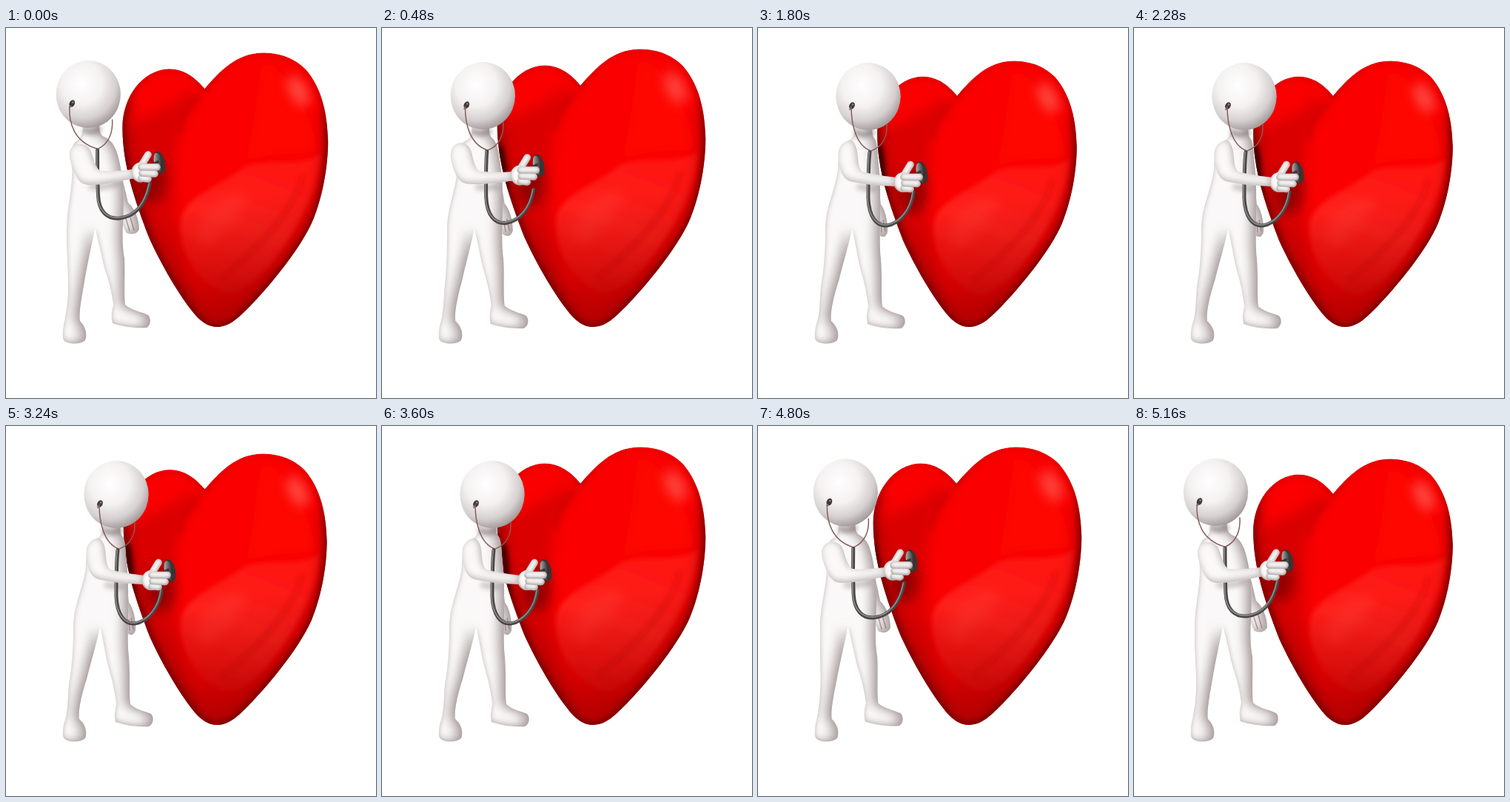
Write an HTML page that moves like this. It is 500 px wide and 500 px high and loops after 5.76 s.

```html
<!DOCTYPE html>
<html lang="en">
<head>
<meta charset="utf-8">
<title>Heart check</title>
<style>
html, body { margin: 0; width: 100%; height: 100%; overflow: hidden; background: #fff; }
svg { display: block; width: 100vw; height: 100vh; }
.tube, .wire { fill: none; stroke-linecap: round; }
.skin { fill: #faf8f8; filter: url(#round); }
.deep { filter: url(#deep); }
.finger { fill: none; stroke: #f4f1f1; stroke-width: 9.5; stroke-linecap: round; filter: url(#soft); }
.wire { stroke: #85605d; stroke-width: 1.5; }
</style>
</head>
<body>
<svg viewBox="0 0 500 500">
<defs>
  <filter id="round" filterUnits="userSpaceOnUse" x="0" y="0" width="500" height="500" color-interpolation-filters="sRGB">
    <feGaussianBlur in="SourceAlpha" stdDeviation="5"/>
    <feOffset dx="-2" dy="-2" result="b"/>
    <feComposite in="SourceAlpha" in2="b" operator="out" result="edge"/>
    <feFlood flood-color="#a39696" flood-opacity=".8"/>
    <feComposite in2="edge" operator="in" result="shade"/>
    <feMerge><feMergeNode in="SourceGraphic"/><feMergeNode in="shade"/></feMerge>
  </filter>
  <filter id="deep" filterUnits="userSpaceOnUse" x="0" y="0" width="500" height="500" color-interpolation-filters="sRGB">
    <feGaussianBlur in="SourceAlpha" stdDeviation="7"/>
    <feOffset dx="-8" dy="0" result="b"/>
    <feComposite in="SourceAlpha" in2="b" operator="out" result="edge"/>
    <feFlood flood-color="#a09292" flood-opacity=".82"/>
    <feComposite in2="edge" operator="in" result="shade"/>
    <feGaussianBlur in="SourceAlpha" stdDeviation="3"/>
    <feComposite in="SourceAlpha" operator="out" result="thin"/>
    <feFlood flood-color="#9a8e8e" flood-opacity=".5"/>
    <feComposite in2="thin" operator="in" result="line"/>
    <feComposite in="line" in2="SourceAlpha" operator="in" result="line2"/>
    <feMerge><feMergeNode in="SourceGraphic"/><feMergeNode in="shade"/><feMergeNode in="line2"/></feMerge>
  </filter>
  <filter id="soft" filterUnits="userSpaceOnUse" x="0" y="0" width="500" height="500" color-interpolation-filters="sRGB">
    <feGaussianBlur in="SourceAlpha" stdDeviation="2"/>
    <feOffset dx="-.5" dy="-1.4" result="b"/>
    <feComposite in="SourceAlpha" in2="b" operator="out" result="edge"/>
    <feFlood flood-color="#7b6f6f" flood-opacity=".85"/>
    <feComposite in2="edge" operator="in" result="shade"/>
    <feMerge><feMergeNode in="SourceGraphic"/><feMergeNode in="shade"/></feMerge>
  </filter>
  <filter id="blur3" filterUnits="userSpaceOnUse" x="0" y="-50" width="500" height="550"><feGaussianBlur stdDeviation="3"/></filter>
  <filter id="blur8" filterUnits="userSpaceOnUse" x="0" y="-50" width="500" height="550"><feGaussianBlur stdDeviation="8"/></filter>
  <radialGradient id="ball" cx=".4" cy=".34" r=".7">
    <stop offset="0" stop-color="#fff"/><stop offset=".45" stop-color="#f4f1f1"/>
    <stop offset=".75" stop-color="#d6d0d0"/><stop offset="1" stop-color="#9d9393"/>
  </radialGradient>
  <linearGradient id="rim" x1="0" y1="0" x2="0" y2="1">
    <stop offset=".06" stop-color="#c00000" stop-opacity=".3"/>
    <stop offset=".3" stop-color="#820000"/><stop offset="1" stop-color="#800000"/>
  </linearGradient>
  <linearGradient id="low" x1=".4" y1="0" x2=".55" y2="1">
    <stop offset=".55" stop-color="#8c0000" stop-opacity="0"/>
    <stop offset=".8" stop-color="#8c0000" stop-opacity=".32"/>
    <stop offset="1" stop-color="#8c0000" stop-opacity=".7"/>
  </linearGradient>
  <linearGradient id="sheen" x1=".2" y1="1" x2=".6" y2="0">
    <stop offset="0" stop-color="#f02a24" stop-opacity=".4"/>
    <stop offset=".5" stop-color="#ff2a24"/><stop offset="1" stop-color="#ff1a16"/>
  </linearGradient>
  <linearGradient id="steel" x1="0" y1="0" x2="1" y2=".4">
    <stop offset="0" stop-color="#c9c5c5"/><stop offset=".5" stop-color="#777"/><stop offset="1" stop-color="#332c2c"/>
  </linearGradient>
  <path id="outline" d="M269,91 C262,83 247,65 222,65 C187,66 161,102 161,142 C161,192 178,240 196,287 C210,318 236,365 259,391 C268,400 276,404 285,404 C297,404 306,398 316,389 C347,360 395,302 411,264 C425,230 431,190 431,160 C430,125 424,92 402,66 C385,49 365,44 344,44 C310,45 289,68 269,91Z"/>
  <clipPath id="inside"><use href="#outline" class="beat"/></clipPath>
</defs>

<g clip-path="url(#inside)">
  <g class="beat">
    <use href="#outline" fill="#fa0000"/>
    <path d="M262,100 C248,118 236,135 232,165 C228,215 226,290 258,385 L240,385 C190,300 165,220 162,150 C180,125 230,120 245,95Z" fill="#cc0000" opacity=".7" filter="url(#blur8)"/>
    <path d="M168,105 C150,160 180,250 205,305 C220,340 240,370 262,396" fill="none" stroke="#8a0000" stroke-width="16" opacity=".6" filter="url(#blur8)"/>
    <path d="M262,100 C248,116 238,128 236,150" fill="none" stroke="#c00000" stroke-width="8" opacity=".4" filter="url(#blur3)"/>
    <path d="M345,55 C338,90 335,140 322,188 C360,172 395,180 418,172 C405,120 385,70 345,55Z" fill="#ff0805" opacity=".6" filter="url(#blur8)"/>
    <path d="M238,262 C245,232 288,220 322,193 C355,181 395,196 422,176 C420,222 394,275 352,326 C326,358 300,366 286,355 C252,336 234,298 238,262Z" fill="url(#sheen)" opacity=".8" filter="url(#blur3)"/>
    <path d="M262,268 C275,235 312,225 326,228 C318,262 290,286 268,300 C260,292 258,280 262,268Z" fill="#ff342d" opacity=".5" filter="url(#blur8)"/>
    <path d="M398,204 C388,250 340,300 292,340" fill="none" stroke="#d00808" stroke-width="6" opacity=".45" filter="url(#blur3)"/>
    <ellipse cx="392" cy="94" rx="11" ry="22" transform="rotate(-28 392 94)" fill="#ff6259" opacity=".75" filter="url(#blur8)"/>
    <use href="#outline" fill="url(#low)"/>
    <path d="M427,120 C434,180 422,250 390,298 C365,335 340,365 316,389" fill="none" stroke="#880000" stroke-width="14" opacity=".5" filter="url(#blur8)"/>
    <use href="#outline" fill="none" stroke="url(#rim)" stroke-width="9" filter="url(#blur3)"/>
  </g>
  <ellipse cx="197" cy="206" rx="19" ry="32" fill="#780000" opacity=".7" filter="url(#blur8)" transform="translate(0,0)" data-to="translate(12,14)" data-arm/>
  <path d="M150,160 C158,190 160,220 160,250" data-to="M163,160 C168,180 169,220 168,250" fill="none" stroke="#2a0000" stroke-width="9" opacity=".85" filter="url(#blur3)"/>
</g>

<path class="skin deep" d="M146,175 C155,190 160,215 165,236 C174,244 180,258 180,272 C176,280 168,279 163,277 C157,268 155,255 154,240 C148,215 144,195 146,175Z"
  data-to="M156,175 C161,190 163,215 166,238 C172,246 176,262 175,276 C172,284 168,283 164,280 C160,270 159,255 158,240 C155,215 154,195 156,175Z"/>
<path class="wire" stroke-opacity=".6" d="M162,258 L167,274 M168,256 L173,273" data-to="M166,262 L167,276 M169,260 L172,274"/>

<path class="skin deep" d="M103,128 C104,138 103,145 97,151 C86,157 87,170 89,195 C88,225 82,245 82,268 C81,300 84,330 84,350 C84,368 81,385 79,396 C76,408 76,418 78,422 C84,428 100,428 107,422 C110,414 108,404 100,396 C98,385 103,360 106,342 C110,318 116,292 120,271 C126,292 129,310 134,328 C140,345 143,360 145,374 C142,384 142,392 144,399 C158,404 175,406 190,405 C196,402 196,392 192,388 C182,383 170,382 161,374 C159,360 161,335 160,312 C157,295 157,280 158,262 C159,235 160,210 154,185 C150,165 145,152 132,147 C126,143 125,138 126,128Z"
  data-to="M130,130 C131,142 131,146 124,151 C112,156 108,170 108,190 C104,220 92,240 91,268 C91,300 89,325 85,348 C83,366 84,383 80,396 C76,408 76,418 78,422 C84,428 100,428 107,422 C110,414 108,404 99,396 C97,385 103,360 109,342 C115,318 123,292 127,272 C132,290 134,310 139,328 C144,345 147,360 149,376 C147,384 146,392 148,400 C160,404 175,407 193,406 C200,402 200,393 196,389 C186,385 176,383 168,376 C166,360 168,335 166,312 C164,295 165,280 165,262 C165,235 166,210 163,185 C161,168 162,158 158,150 C154,146 154,140 155,130Z"/>
<path d="M104,137 C112,142 120,141 127,135" data-to="M131,140 C139,146 149,145 156,139" fill="none" stroke="#857979" stroke-width="8" opacity=".7" filter="url(#blur3)"/>
<path d="M112,214 C128,217 142,212 152,210" data-to="M134,214 C144,217 152,217 160,217" fill="none" stroke="#857979" stroke-width="8" opacity=".4" filter="url(#blur3)"/>

<g transform="translate(0,0)" data-to="translate(38.5,3)">
  <ellipse cx="110.500" cy="89.500" rx="43.700" ry="45.500" fill="url(#ball)"/>
  <ellipse cx="88.500" cy="102" rx="3.600" ry="5" transform="rotate(25 88.500 102)" fill="#3d3939"/>
  <circle cx="89.500" cy="100.500" r="1.300" fill="#918b8b"/>
  <path d="M87,105 L85,108" stroke="#777" stroke-width="2"/>
</g>

<path class="wire" d="M85,106 C84,128 91,154 122,163" data-to="M126,106 C126,130 132,158 152,166"/>
<path class="wire" d="M143,124 C144,140 139,156 124,163" data-to="M174,130 C175,146 169,160 153,166"/>
<path class="tube" stroke="#494646" stroke-width="5" d="M123,165 C123,180 123,205 124,226 C125,248 136,258 152,257 C174,255 188,238 194,210"
  data-to="M151,168 C149,185 149,210 149,230 C150,255 160,268 174,267 C192,264 207,246 210,222"/>
<path class="tube" stroke="#8b8787" stroke-width="1.8" d="M122,165 C122,180 122,205 123,226 C124,247 136,257 152,256 C173,254 187,238 193,210"
  data-to="M150,168 C148,185 148,210 148,230 C149,254 160,267 174,266 C191,263 206,246 209,222"/>

<path class="skin" data-arm d="M96,157 C85,160 84,172 88,183 C92,197 98,212 112,212 C132,212 155,207 174,203 L172,191 C155,193 140,194 127,193 C119,187 118,172 113,163 C108,157 102,156 96,157Z"
  data-to="M122,152 C109,156 107,168 109,180 C111,194 115,206 128,208 C148,212 168,213 186,214 L186,202 C172,200 155,198 141,194 C134,188 136,172 133,162 C130,153 126,151 122,152Z"/>

<g transform="translate(0,0)" data-to="translate(14,13.5)" data-arm>
  <ellipse cx="207.500" cy="182" rx="7.500" ry="15.500" transform="rotate(-12 207.500 182)" fill="#3a3434"/>
  <ellipse cx="205.500" cy="181.500" rx="5.500" ry="13" transform="rotate(-12 205.500 181.500)" fill="url(#steel)"/>
  <path class="tube" stroke="#3b3737" stroke-width="4" d="M196,186 L205,181"/>
  <path class="finger" d="M181,189 L192,171"/>
  <ellipse class="skin" cx="182" cy="195" rx="12.500" ry="13.500" style="filter:url(#soft)"/>
  <path class="finger" d="M183,203 L192,204"/>
  <path class="finger" d="M184,196 L201,197"/>
  <path class="finger" d="M183,188 L204,188"/>
</g>
</svg>
<script>
const STEP = 120, LOOP = 5760, PER_BEAT = 12;
// height of the heart's upper edge through one double beat, and its dip between the two thumps
const tops = [33, 21, 33, 44, 28, 13, 28, 44];
const dips = [44, 44, 37, 44];
const ease = x => Math.sin(Math.PI / 2 * Math.min(1, Math.max(0, x))) ** 2;

const parts = [...document.querySelectorAll('[data-to]')].map(el => {
  const attr = el.hasAttribute('transform') ? 'transform' : 'd';
  return { el, attr, from: el.getAttribute(attr), to: el.dataset.to.match(/-?[\d.]+/g), arm: 'arm' in el.dataset };
});
const hearts = document.querySelectorAll('.beat');

function blend(from, to, p) {
  let i = 0;
  return from.replace(/-?[\d.]+/g, a => (+a + (to[i++] - a) * p).toFixed(2));
}

function heartTop(n) {
  const k = n % PER_BEAT;
  return k === 3 ? dips[Math.floor(n / PER_BEAT)] : tops[k] ?? 44;
}

// 0 leans back, 1 leans in to listen
function lean(n) {
  return n < 36 ? ease((n + .7) / 7.7) : 1 - ease((n - 34.6) / 7.7);
}

function draw(n) {
  const s = (404 - heartTop(n)) / 360.5;
  hearts.forEach(h => h.setAttribute('transform', `translate(285 404) scale(${s}) translate(-285 -404)`));
  const p = lean(n);
  for (const { el, attr, from, to, arm } of parts)
    el.setAttribute(attr, blend(from, to, arm ? p ** 3 : p));
}

let last = -1;
function tick() {
  const n = Math.floor(performance.now() % LOOP / STEP);
  if (n !== last) draw(last = n);
  requestAnimationFrame(tick);
}
tick();
</script>
</body>
</html>
```
